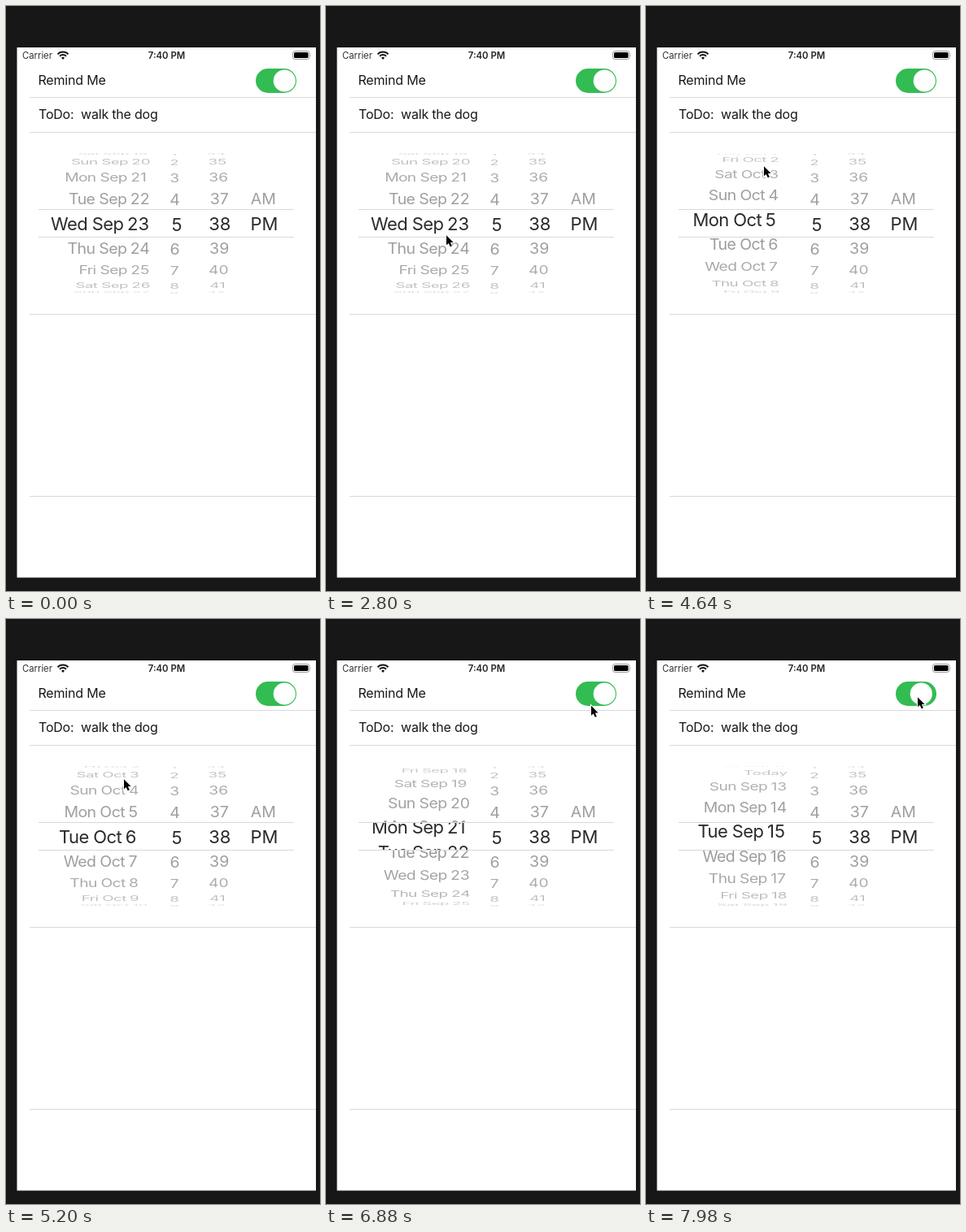
Animation of 386x720 px, one loop 8000 ms. Source, as an HTML page:

```html
<!DOCTYPE html>
<html lang="en">
<head>
<meta charset="utf-8">
<title>Reminder picker</title>
<style>
  html, body { margin: 0; height: 100%; overflow: hidden; background: #171717; }
  svg { display: block; font-family: Inter, "Open Sans", sans-serif; }
  text { white-space: pre; }
  .label { font-size: 16px; letter-spacing: -.2px; fill: #181818; }
  .rule { stroke: #d9d9db; }
  .far { font-size: 19.6px; }
  .near { font-size: 22px; fill: #2a2a2a; }
  .tight { letter-spacing: -.6px; }
</style>
</head>
<body>
<svg width="386" height="720" viewBox="0 0 386 720">
  <defs>
    <clipPath id="outer"><path d="M14 181H381V250H14zM14 285H381V354H14z"/></clipPath>
    <clipPath id="inner"><path d="M14 251H381V284H14z"/></clipPath>
  </defs>
  <rect x="13.5" y="51" width="367.5" height="652.5" fill="#fff"/>

  <text x="20" y="65" font-size="11.3" fill="#333">Carrier</text>
  <g fill="none" stroke="#111" stroke-width="2">
    <path d="M63.5 59.2a9 9 0 0 1 13 0M66 61.8a5.6 5.6 0 0 1 8 0"/>
    <path d="M70 66l-2-2.2a2.8 2.8 0 0 1 4 0z" fill="#111" stroke="none"/>
  </g>
  <text x="197.5" y="65" font-size="11.3" font-weight="600" text-anchor="middle" fill="#222">7:40 PM</text>
  <rect x="352.5" y="55.5" width="20.5" height="10" rx="2.8" fill="none" stroke="#999"/>
  <rect x="354" y="57" width="17.5" height="7" rx="1.5"/>
  <path d="M374.3 59v3.4q1.2-1.7 0-3.4z" fill="#999"/>

  <text class="label" x="39.5" y="97">Remind Me</text>
  <text class="label" x="40" y="139.3">ToDo:  walk the dog</text>
  <rect x="307" y="77" width="50" height="30" rx="15" fill="#33bc52"/>
  <circle id="knob" cy="92" r="13.6" fill="#fff"/>
  <path class="rule" d="M29 112.5H381M29 155.5H381M29 379.5H381M29 603.5H381M40 250.5H354M40 284.5H354"/>

  <g id="far" class="far" clip-path="url(#outer)"></g>
  <g id="near" class="near" clip-path="url(#inner)"></g>
  <path id="cursor" d="M.5 .8V12.8L3.2 10.4L5.2 14.8L7.3 13.9L5.4 9.6H9.1z" stroke="#fff" stroke-width="2" paint-order="stroke"/>
</svg>
<script>
const LOOP = 8000, RADIUS = 85.5, STEP = .365, CX = 197, CY = 267.7, DEPTH = 1116;
const $ = id => document.getElementById(id);
const clamp = x => Math.min(1, Math.max(0, x));
const smooth = x => x * x * (3 - 2 * x);

// Three steps every 140 ms, shown for 20, 100 and 20 ms.
function stepAt(t) {
  const r = t % 140;
  return 3 * Math.floor(t / 140) + (r < 20 ? 0 : r < 120 ? 1 : 2);
}

// Days scrolled from Sep 23: two drags, each followed by a coasting stop.
function daysAt(n) {
  const coast = (rate, stop, power) => (rate * Math.max(0, stop - n)) ** power;
  if (n < 77.5) return 3 * clamp((n - 68) / 9.5) ** 2;
  if (n < 118) return 13 - coast(.08, 111.6, 2.3);
  if (n < 130) return 13 - 5.05 * ((n - 118) / 12) ** 1.5;
  return -8 + coast(.1035, 175.05, 1.8);
}

// [step, x, y, ease-in power]; no power means smooth
const path = [
  [33, 159, 356], [42, 147.5, 281.5], [68, 147.5, 281.5], [77.5, 147.5, 187.5, 2],
  [84, 147.5, 187.5], [97, 144.5, 196.5], [118, 144.5, 196.5], [130, 136, 355.6, 1.5],
  [131.5, 135, 361.5], [135.5, 135, 361.5], [148, 325.5, 106], [152, 337, 84], [158, 333.5, 95.5]
];

function cursorAt(n) {
  const i = path.findIndex(p => p[0] > n);
  if (i < 1) return path.at(i).slice(1, 3);
  const [n0, x0, y0] = path[i - 1], [n1, x1, y1, power] = path[i];
  const u = (n - n0) / (n1 - n0), e = power ? u ** power : smooth(u);
  return [x0 + (x1 - x0) * e, y0 + (y1 - y0) * e];
}

const dateAt = i => new Date(2020, 8, 23 + i);
const isToday = i => i === -11;
// Dates with a single digit sit a little further left.
const dateShift = i => dateAt(i).getDate() < 10 ? -2.3 : 0;

// x holds the far and the near position
const columns = [
  { x: [148, 144.3], anchor: "end", cls: "tight", shift: dateShift, text: i => isToday(i) ? "" : dateAt(i).toDateString().slice(0, 7) },
  { x: [152.5, 149], anchor: "start", shift: dateShift, text: i => isToday(i) ? "" : dateAt(i).getDate() },
  { x: [173, 173], anchor: "end", text: i => isToday(i) ? "Today" : "" },
  { x: [207.5, 210], anchor: "middle", dy: .8, fixed: true, text: i => 5 + i },
  { x: [262.5, 262.8], anchor: "middle", fixed: true, text: i => 38 + i },
  { x: [317, 317.5], anchor: "middle", fixed: true, text: i => ({ "-1": "AM", 0: "PM" })[i] ?? "" }
];

function rows(near, days) {
  const size = near ? 22 : 19.6;
  let out = "";
  for (const c of columns) {
    const pos = c.fixed ? 0 : days;
    for (let i = Math.ceil(pos - 4.3); i <= pos + 4.3; i++) {
      const a = (i - pos) * STEP, cos = Math.cos(a), text = c.text(i);
      if (cos <= 0 || text === "") continue;
      const s = DEPTH / (DEPTH + RADIUS * (1 - cos));
      const x = c.x[+near] - CX + (c.shift ? c.shift(i) : 0);
      const y = CY + (c.dy || 0) + RADIUS * Math.sin(a);
      const opacity = near ? 1 : .4 * (.3 + .7 * cos);
      out += `<text class="${c.cls || ""}" x="${x}" y="${size * .364}" text-anchor="${c.anchor}"
        opacity="${opacity}" transform="translate(${CX} ${y}) scale(${s} ${s * cos})">${text}</text>`;
    }
  }
  return out;
}

let last = -1;
function draw(now) {
  requestAnimationFrame(draw);
  const n = stepAt(now % LOOP);
  if (n === last) return;
  last = n;
  const days = daysAt(n), [x, y] = cursorAt(n);
  $("far").innerHTML = rows(false, days);
  $("near").innerHTML = rows(true, days);
  $("cursor").setAttribute("transform", `translate(${x} ${y})`);
  $("cursor").setAttribute("visibility", n < 23 ? "hidden" : "visible");
  $("knob").setAttribute("cx", 342.3 - 4 * clamp((n - 168) / 3));
}
draw(performance.now());
</script>
</body>
</html>
```
